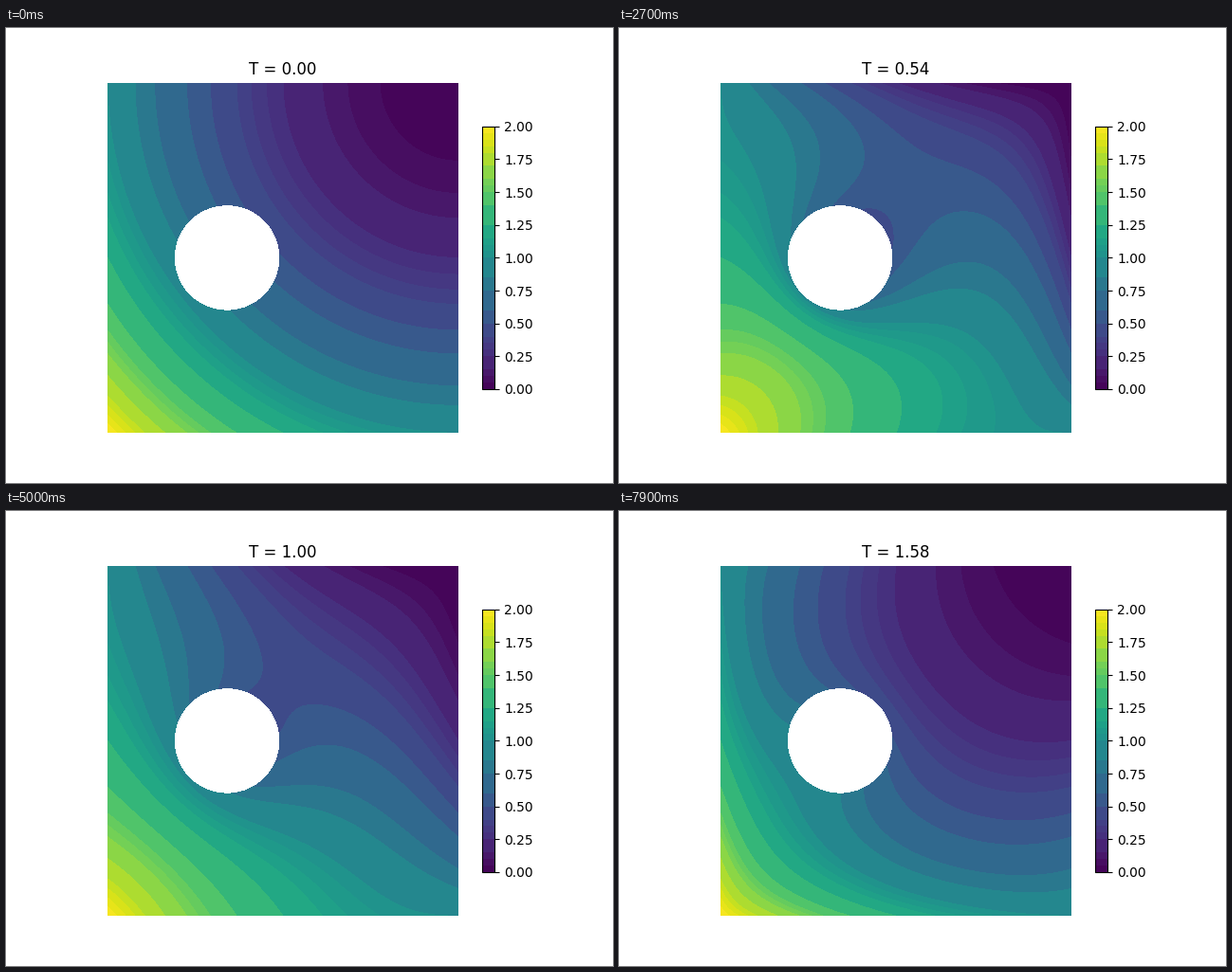
Recreate the animation shown at these times as a matplotlib script. Size 640 by 480 pixels, loop 8 s.

```python
import numpy as np
import matplotlib.pyplot as plt
from matplotlib.animation import FuncAnimation
from matplotlib.patches import Circle

N = 80                # grid cells per side
FRAMES = 80
DT = 0.02             # model time per frame
SUBSTEPS = 300
K = 0.16              # diffusivity
CX, CY, R = 0.3405, 0.5, 0.148

# Bands that read as one colour are merged.
STEPS = [0, 1, 2, 3, 5, 6, 7, 8, 10, 12, 15, 17, 20, 21, 22, 23,
         25, 28, 30, 31, 32, 34, 36, 37, 38, 39, 40]
LEVELS = np.array(STEPS) / 20

h = 1 / N
axis = np.linspace(0, 1, N + 1)
X, Y = np.meshgrid(axis, axis)
G = (1 - X)**2 + (1 - Y)**2          # initial state and boundary value
inner = (slice(1, -1), slice(1, -1))
xi, yi = X[inner], Y[inner]
free = (xi - CX)**2 + (yi - CY)**2 > R**2


def spacing(p, q, cp, cq, sign):
    """Distance along p to the next node, or to the hole if it is nearer."""
    half = np.sqrt(np.maximum(R**2 - (q - cq)**2, 0))
    gap = sign * (cp - p) - half
    hits = (half > 0) & (gap >= 0) & (gap < h)
    return np.where(hits, np.maximum(gap, 0.3 * h), h)


def pair(p, q, cp, cq):
    """Diffusion weights of both neighbours and the gradient weight."""
    ahead, behind = spacing(p, q, cp, cq, 1), spacing(p, q, cp, cq, -1)
    span = ahead + behind
    return 2 * K / (ahead * span), 2 * K / (behind * span), 1 / span


east, west, grad_x = pair(xi, yi, CX, CY)
north, south, grad_y = pair(yi, xi, CY, CX)


def wind(t):
    return np.cos(np.pi * t / 2)


def solve():
    """Diffusion with a diagonal wind that swings back and forth."""
    dt = DT / SUBSTEPS
    v = np.zeros_like(G)              # departure from the boundary value
    core = v[inner]
    vn, vs, ve, vw = v[2:, 1:-1], v[:-2, 1:-1], v[1:-1, 2:], v[1:-1, :-2]
    states = [G.copy()]
    for n in range(FRAMES - 1):
        b = wind((n + 0.5) * DT)
        mask = dt * free
        ce, cw = mask * (east - b * grad_x), mask * (west + b * grad_x)
        cn, cs = mask * (north - b * grad_y), mask * (south + b * grad_y)
        c0 = free - mask * (east + west + north + south)
        source = mask * (4 * K + 2 * b * (2 - xi - yi))
        for _ in range(SUBSTEPS):
            core[:] = c0 * core + ce * ve + cw * vw + cn * vn + cs * vs + source
        states.append(np.clip(G + v, 0, 2))
    return states


states = solve()

fig, ax = plt.subplots(figsize=(6.4, 4.8), dpi=100)
ax.set_aspect("equal")
ax.axis("off")


def draw_field(n):
    return ax.contourf(X, Y, states[n], levels=LEVELS, cmap="viridis",
                       vmin=0, vmax=2)


field = draw_field(0)
bar = fig.colorbar(field, ax=ax, shrink=0.75, spacing="proportional",
                   ticks=np.arange(0, 2.01, 0.25), format="%.2f")
bar.minorticks_off()
ax.set_xlim(0, 1)
ax.set_ylim(0, 1)
ax.add_patch(Circle((CX, CY), R, facecolor="white", edgecolor="none",
                    antialiased=False, zorder=3))
title = ax.set_title("T = 0.00")


def update(n):
    global field
    field.remove()
    field = draw_field(n)
    title.set_text(f"T = {n * DT:.2f}")
    return field, title


anim = FuncAnimation(fig, update, frames=FRAMES, interval=100, repeat=True,
                     repeat_delay=0, blit=False)
plt.show()
```
